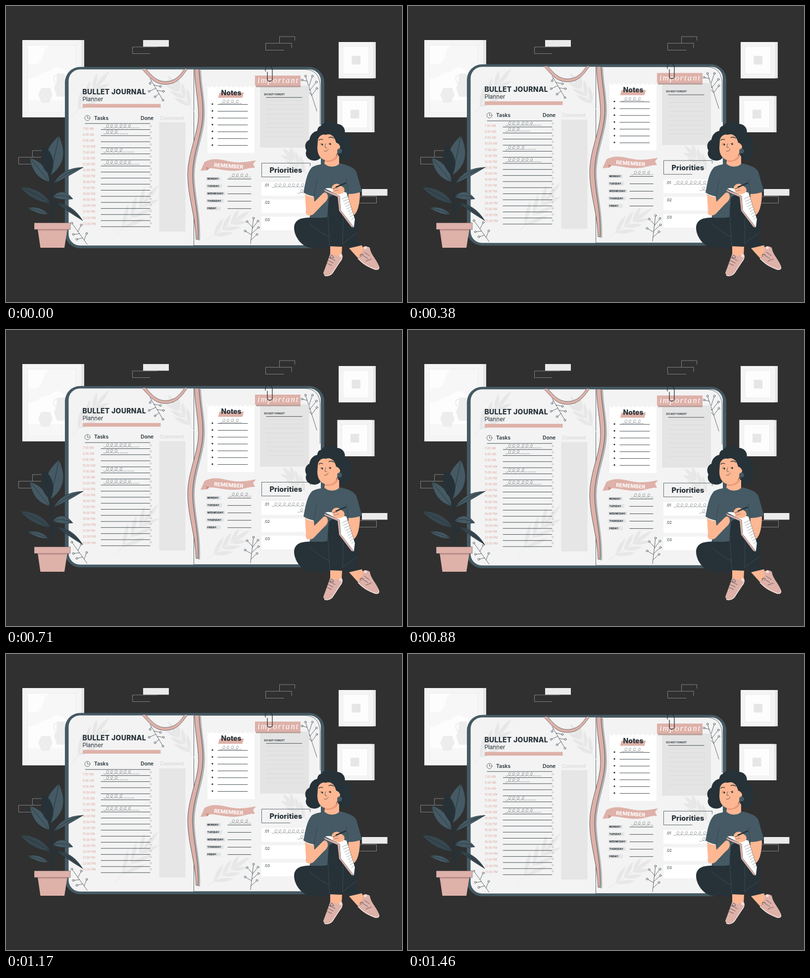
These frames come from a looping animation (800x600 px, 1.5 s). An HTML page:

```html
<!DOCTYPE html>
<html lang="en">
<head>
<meta charset="utf-8">
<title>Journal planner</title>
<style>
  html, body { margin: 0; width: 100%; height: 100%; overflow: hidden; background: #303030; }
  svg { display: block; width: 800px; height: 600px; }
  text { font-family: Inter, "Open Sans", sans-serif; fill: #263238; }
  .ink { fill: none; stroke: #263238; stroke-width: .7; stroke-linecap: round; stroke-linejoin: round; }
  .rule { stroke-width: .85; }
  .thin { stroke-width: .45; }
  .outline { fill: none; stroke: #a6a6a6; stroke-width: .7; }
  .skin { fill: #fdb793; }
  .pink { fill: #deb1a9; }
  .dark { fill: #263238; }
  .teal { fill: #455a64; }
</style>
</head>
<body>
<svg viewBox="0 0 800 600">
  <rect width="800" height="600" fill="#303030"/>

  <g id="frames"></g>
  <path fill="#ebebeb" d="M277 69h52v13.500h-52zM719 371h51.500v13.500h-51.500z"/>
  <path class="outline" d="M306 82V83H255.500V96.500H291M552.500 75V62H583.500V70M577 85V75.500H524.500V89.500H562M72 306.500H25.500V320.500H60M53.500 306V293H72M710 386H748.500V399.500H714"/>

  <g id="journal">
    <rect class="teal" x="119" y="123.500" width="524" height="367.500" rx="31"/>
    <rect x="126.500" y="128.500" width="509.500" height="357" rx="23" fill="#f3f3f3"/>
    <path class="ink" d="M379.500 129V485.500H604M386 128.500H604Q633 130 634.500 160V240"/>
    <g id="foliage"></g>

    <path class="pink" stroke="#263238" stroke-width=".6" d="M274 127C289 143 299 159 322 159C345 159 355 144 367 127H361C352 140 342 153 322 153C304 153 294 140 282 127Z"/>

    <text x="154.500" y="179.300" font-size="14" font-weight="800" letter-spacing=".3">BULLET JOURNAL</text>
    <text x="154.500" y="193" font-size="11.700">Planner</text>
    <path class="pink" d="M155 198.500H312.500V206H155z"/>

    <circle class="ink" cx="164.500" cy="227" r="5.300"/>
    <path class="ink" d="M164.500 223.500V227.300H167.500"/>
    <g font-size="10.300" font-weight="600">
      <text x="178" y="230.500">Tasks</text>
      <text x="272" y="230.500">Done</text>
      <text x="311" y="230.500" style="fill:#dadada">Comment</text>
    </g>
    <path fill="#e6e6e6" d="M309.500 235.500H362.500V457H309.500z"/>
    <g id="tasks"></g>

    <path fill="#b3b3b3" transform="translate(4 2)" d="M381 128H390C391 160 399 190 397.500 222C396 262 377 298 377 342C378 387 390 420 388 473H384C383 425 367 387 367 340C368 296 388 260 389 222C389 190 381 160 381 128Z"/>
    <path class="pink" stroke="#263238" stroke-width=".7" d="M381 128H390C391 160 399 190 397.500 222C396 262 377 298 377 342C378 387 390 420 388 473H384C383 425 367 387 367 340C368 296 388 260 389 222C389 190 381 160 381 128Z"/>

    <path id="notePaper" fill="#fff"/>
    <path class="pink" d="M431.500 175.500H480.500L477.500 186H428.500z"/>
    <text x="434.500" y="180.500" font-size="14" font-weight="800">Notes</text>
    <g id="notes"></g>

    <path fill="#e4e4e4" d="M513.500 161H612V287H513.500z"/>
    <path fill="#b9a09b" d="M505 160H595V164.500H505z"/>
    <path class="pink" d="M503 141H595V161.500H503z"/>
    <text x="508" y="156" font-size="17" font-style="italic" letter-spacing="1.900" style="font-family:'Liberation Serif',serif;fill:#fff">important</text>
    <text x="521.500" y="180.700" font-size="5.100" font-weight="700">DO NOT FORGET</text>
    <g id="reminder"></g>
    <path class="ink" style="stroke-width:1.300" d="M524 132V127Q525 122 531 122.500Q538 123 538 129V147Q538 152.500 533 152.500Q528 152.500 528 147V134"/>

    <path class="pink" d="M393 334L401 316C425 303 445 317 470 317C485 317 496 314 505 313L499 320L503 328C488 327 480 334 460 334C440 334 420 328 411 329L406 333Z"/>
    <path fill="#c48f86" d="M411 329L406 333L404 326Z"/>
    <text x="420" y="328" font-size="10.500" font-weight="700" transform="rotate(4 450 326)" style="fill:#fff">REMEMBER</text>
    <g id="days"></g>

    <path class="ink" d="M574 346.500H516.500V318.500H614.500V324"/>
    <text x="532.500" y="338.200" font-size="14.600" font-weight="800">Priorities</text>
    <g id="priorities"></g>
  </g>

  <g id="plant">
    <path class="ink" style="stroke-width:5" d="M92 335C88 370 96 400 92 442M92 430Q100 400 104 398"/>
    <g id="plantLeaves"></g>
    <path class="pink" d="M64 452H124L118 490H69.500z"/>
    <path fill="#c99a92" d="M64 452.500H124L123.500 455.500H64.500z"/>
    <path class="pink" stroke="#263238" stroke-width=".4" d="M57 439.500H130V453H57z"/>
  </g>

  <g id="woman">
    <path class="dark" d="M637 243C642 233 662 231 668 239C680 239 687 250 684 258C696 262 700 274 696 282C700 294 698 307 686 311C678 314 670 311 666 304L638 300C638 310 628 315 619 313C608 311 603 301 607 293C602 284 605 275 613 271C614 261 622 254 629 253C629 247 633 243 637 243Z"/>
    <path class="skin" d="M645 304H673V320C668 328 650 328 643 321Z"/>
    <path fill="#eb9a7c" d="M645 311Q660 314 671 299V304Q666 317 645 316Z"/>
    <path class="skin" d="M630 272C632 263 639 259 646 261C656 257 664 264 667 277C671 278 674 281 675 285C675 289 672 291 671 291C669 305 661 313 651 313C637 313 629 303 629 287Z"/>
    <circle class="teal" cx="674" cy="294" r="5"/>
    <circle class="dark" cx="639" cy="281" r="1.700"/>
    <circle class="dark" cx="655" cy="280" r="1.700"/>
    <path class="ink" style="stroke-width:1.300" d="M632 272Q635 269 640 271M652 267Q657 264 662 268"/>
    <path class="ink" d="M646 279Q643 286 645 287H648M643 294Q648 296 651 290M635 280L639 279M652 279L656 278"/>

    <path class="skin" d="M691 378H715C715 402 710 421 701 425C691 424 681 395 676 382Z"/>
    <path class="teal" d="M644 320C650 327 667 328 674 319C690 322 704 327 708 337L719 376Q707 381 692 381L689 430H613L622 386Q610 384 601 378C605 356 608 338 618 327C626 322 636 321 644 320Z"/>
    <path class="ink thin" d="M622 386L628 352M692 380L687 351M618 410Q627 414 640 404"/>
    <path class="skin" d="M604 381Q613 387 622 387L623 397L641 379C649 374 656 390 643 399L621 422C611 428 603 423 606 414Z"/>

    <path class="dark" d="M613 429C622 429 640 430 649 428L652 390C657 380 674 381 679 394L684 428H711C713 451 710 467 707 476L721 483L691 492L681 480L679 489L654 488L655 490H613C596 486 582 467 582 449C583 433 596 429 613 429Z"/>
    <path class="ink thin" style="stroke:#526870" d="M650 418L654 486M681 430L680 482Q694 470 709 460M613 440Q637 462 654 468"/>

    <path class="skin" d="M655 487L679 488L678 506Q666 512 655 503zM693 491L719 485L722 493Q718 507 711 511z"/>
    <path class="pink" d="M655 502Q666 510 678 502Q682 508 677 516Q669 525 661 540C655 548 643 550 641 541C645 530 651 514 655 502Z"/>
    <path class="pink" d="M720 489Q729 485 735 490C737 504 748 513 754 528Q755 536 746 535C731 529 717 522 711 511Q722 504 720 489Z"/>
    <path fill="none" stroke="#f5e8e4" stroke-width="1.500" d="M678 505Q681 511 674 519L659 542Q652 549 643 546M711 512Q727 528 747 534Q754 535 753 529"/>
    <path class="ink" d="M653 510L665 516M651 516L661 521M649 522L658 526M655 509Q658 500 662 510Q651 512 655 509M720 505L731 512M724 499L734 506M722 504Q711 501 717 508M727 517L738 513"/>
    <circle cx="676" cy="506" r="3" fill="#f5dcd6"/>
    <circle cx="726" cy="490" r="3" fill="#f5dcd6"/>

    <path class="pink" d="M642 372L674 384L676 414L703 449L698 448L673 415L670 387L645 376Z"/>
    <path fill="#fff" stroke="#263238" stroke-width=".4" d="M644 370Q654 367 663 371L688 378L705 432L703 449L676 414L674 385Z"/>
    <path class="ink thin" id="writing"/>
    <path class="skin" d="M658 367Q663 358 672 361L682 368Q687 376 679 380Q669 384 661 377Z"/>
    <path class="ink thin" d="M661 370L670 369M663 375L672 373"/>
    <path class="ink" style="stroke-width:2.600" d="M667 367L686 359"/>
    <path class="ink" d="M661 371L667 367"/>
  </g>
</svg>

<script>
const $ = id => document.getElementById(id);
const range = (n, fn) => Array.from({ length: n }, (_, i) => fn(i)).join('');
const line = (x1, x2, y) => `<path class="ink rule" d="M${x1} ${y}H${x2}"/>`;
const box = (x, y, w, h, fill) => `<rect x="${x}" y="${y}" width="${w}" height="${h}" fill="${fill}"/>`;
const label = (x, y, size, weight, str, fill = '#263238') =>
  `<text x="${x}" y="${y}" font-size="${size}" font-weight="${weight}" style="fill:${fill}">${str}</text>`;

// Looped handwriting followed by a few dashes
const scribble = (x, y, loops, dashes = 0) =>
  `<path class="ink thin" d="M${x} ${y}q2 2 4 0${range(loops, i =>
    `c6 0 ${9 - i % 2} -7 5 -7s-5 ${7 + i % 2} ${3 + i % 3} 7`)}${range(dashes, () => 'm2 0h2.500')}"/>`;

const leafShape = (len, w, bend = 0) =>
  `M0 0Q${len * .45} ${bend - w} ${len} 0Q${len * .45} ${bend + w} 0 0`;

function branch(x, y, angle, length, leaf) {
  const step = length / 5;
  const leaves = range(3, i => range(2, s =>
    `<path d="${leafShape(leaf * (1 - i * .08), 8)}" transform="translate(${step * (i + .8)}) rotate(${s ? 27 : -27})"/>`));
  return `<g fill="#e7e7e7" transform="translate(${x} ${y}) rotate(${angle})">${leaves}
    <path d="${leafShape(leaf, 8)}" transform="translate(${length - leaf})"/>
    <path d="M0 0H${length - leaf}" stroke="#e7e7e7"/></g>`;
}

// Berries on twigs that join a stem running from root to tip
function sprig(root, tip, berries) {
  const [rx, ry] = root, [tx, ty] = tip;
  const twigs = berries.map(([x, y, k]) => {
    const jx = rx + (tx - rx) * k, jy = ry + (ty - ry) * k;
    return `<path d="M${jx} ${jy}L${x} ${y}"/><circle cx="${x}" cy="${y}" r="1.900" fill="#f3f3f3"/>`;
  });
  return `<g class="ink"><path d="M${rx} ${ry}L${tx} ${ty}"/>${twigs.join('')}</g>`;
}

function pictureFrame(x, y, w, h, side, margin) {
  const face = w - side, r = x + face, b = y + h, m = margin;
  return box(x, y, w, h, '#e6e6e6') + box(x, y, face, h, '#f5f5f5') +
    box(x + m, y + m, face - 2 * m, h - 2 * m, '#fdfdfd') +
    `<path fill="none" stroke="#e3e3e3" stroke-width=".6" d="M${x} ${y}l${m} ${m}H${r - m}V${b - m}H${x + m}V${y + m}
      M${r} ${y}l${-m} ${m}M${x} ${b}l${m} ${-m}M${r} ${b}l${-m} ${-m}"/>`;
}

$('frames').innerHTML =
  pictureFrame(33, 69, 125, 156.5, 6, 10.5) +
  `<path fill="#f7f7f7" d="M44 121C55 112 57 125 70 112C80 97 73 87 88 80H141V133C128 142 120 130 108 125C94 120 93 134 78 134C68 134 66 148 44 147ZM44 191H141V214H44Z"/>
   <path fill="#ededed" d="M71 166H89L94 180L87 196H72L65 180ZM103 137H119V184H103L97 166L102 154Z"/>
   <path fill="none" stroke="#ededed" stroke-width="2" d="M103 140Q93 142 98 153L102 157"/>` +
  pictureFrame(672, 73, 75, 73.5, 5, 9) + box(698.5, 101, 17.5, 17.5, '#e6e6e6') +
  pictureFrame(669.5, 182.5, 75, 73.5, 5, 9) + box(696, 210.5, 17.5, 17.5, '#e6e6e6');

$('foliage').innerHTML =
  branch(134, 224, -51, 118, 44) + branch(380, 214, -126, 90, 36) +
  branch(222, 466, -50, 134, 50) + branch(406, 474, -34, 104, 40) + branch(612, 345, -133, 78, 34) +
  sprig([291, 147], [317, 191], [[291, 157, .1], [289, 173, .45], [301, 184, .7], [317, 191, 1], [318, 173, .55], [312, 163, .3]]) +
  sprig([628, 213], [605, 142], [[605, 142, 1], [598, 150, .85], [619, 142, .7], [627, 154, .6], [597, 164, .6], [606, 169, .45], [628, 167, .45]]) +
  sprig([164, 483], [133, 440], [[133, 440, 1], [152, 444, .6], [136, 463, .5], [163, 461, .2], [143, 473, .3]]) +
  sprig([494, 482], [500, 430], [[500, 430, 1], [487, 437, .65], [509, 436, .6], [483, 456, .35], [510, 449, .4], [507, 463, .15]]);

$('tasks').innerHTML = line(160, 291, 238.2) + range(17, i => {
  const hour = i + 7, y = 250.5 + 12.3 * i;
  return label(155, 250.6 + 12.06 * i, 5.7, 400, `${hour}:00 ${hour < 12 ? 'AM' : 'PM'}`, '#dba59c') +
    line(192, 291, y) + box(290.5, y - 9, 4, 4, '#d6d6d6');
}) + scribble(197, 247, 6, 3) + scribble(197, 259, 3, 4) + scribble(197, 296, 4, 5) + scribble(197, 321, 6, 3);

$('notePaper').setAttribute('d', `M407 298V160${range(10, () => 'q1 5 4.750 5t4.750 -5')}V298Z`);
$('notes').innerHTML = scribble(432, 197.5, 4, 1) + range(7, i => {
  const y = 199.3 + 13.85 * i;
  return `<circle class="dark" cx="417" cy="${y - .5}" r="1.600"/>` + line(428, 488, y + .2);
});

$('reminder').innerHTML = line(526, 598, 185.3) +
  range(9, i => box(526, 191 + 9.2 * i, 75, .7, '#d6d6d6'));

$('days').innerHTML = ['MONDAY', 'TUESDAY', 'WEDNESDAY', 'THURSDAY', 'FRIDAY'].map((day, i) => {
  const y = 350.3 + 15 * i;
  return `<rect x="404" y="${y - 4}" width="${day.length * 3 + 12}" height="8" rx="2" fill="#e6e6e6"/>` +
    label(406.5, y + 1.8, 5, 800, day + ':') + line(448, 495, y + .4);
}).join('') + scribble(451, 347, 4, 1);

$('priorities').innerHTML = range(3, i => {
  const y = 357 + 35 * i;
  return box(516, y, 100, 27.5, '#fff') + label(521.5, y + 9, 7.5, 400, '.0' + (i + 1));
}) + scribble(537, 367, 7) + scribble(589, 379, 1);

// Each leaf: base, tip, half width, bend, fill
$('plantLeaves').innerHTML = [
  [88, 357, 48, 307, 21, 0, '#455a64'], [90, 343, 107, 263, 34, 0, '#455a64'],
  [89, 343, 77, 282, 23, 0, '#263238'], [96, 360, 156, 327, 11, -9, '#455a64'],
  [94, 387, 135, 391, 15, -9, '#455a64'], [90, 400, 28, 367, 17, 3, '#37474f'],
  [86, 423, 43, 409, 10, 3, '#455a64'], [102, 399, 155, 435, 9, -7, '#37474f']
].map(([x, y, tx, ty, w, bend, fill]) => {
  const len = Math.hypot(tx - x, ty - y), angle = Math.atan2(ty - y, tx - x) * 180 / Math.PI;
  return `<g transform="translate(${x} ${y}) rotate(${angle})" stroke="#263238" stroke-width=".5">
    <path d="${leafShape(len, w, bend)}" fill="${fill}"/><path d="${leafShape(len, 0, bend)}" fill="none"/></g>`;
}).join('');

$('writing').setAttribute('d', range(9, i => `M${679 + 2.4 * i} ${391 + 5.2 * i}l${11 - i * .6} -5`));

const LOOP = 1500, STEPS = 36, RISE = 10.3;

function draw(now) {
  const step = Math.floor(now % LOOP / LOOP * STEPS + .1) % STEPS;
  const lift = RISE * (1 - Math.abs(1 - 2 * step / (STEPS - 1)));
  $('journal').setAttribute('transform', `translate(0 ${-lift})`);
  requestAnimationFrame(draw);
}
draw(0);
</script>
</body>
</html>
```
